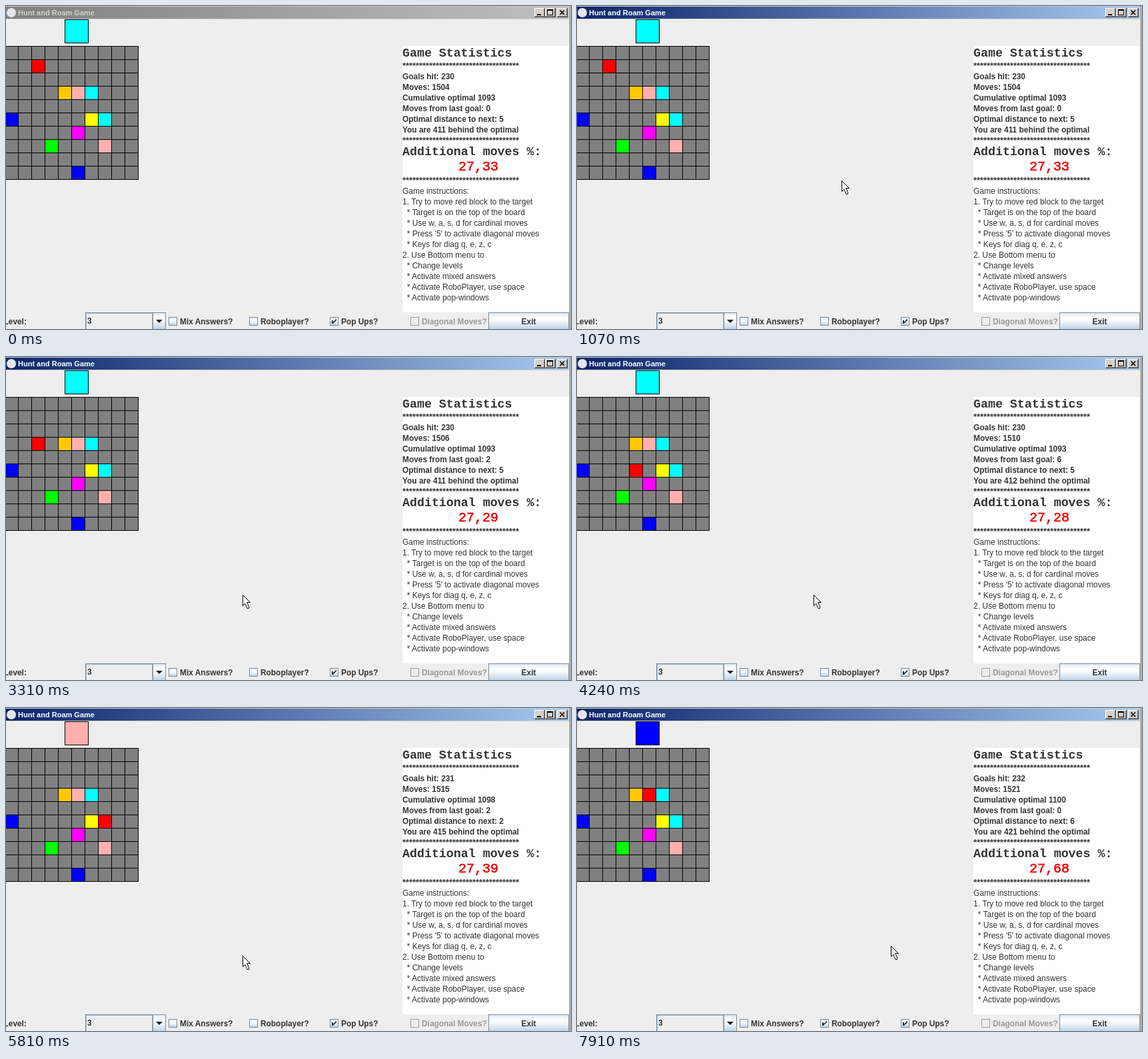
Recreate the animation shown at these times as an HTML page. Size 848 by 485 pixels, loop 7990 ms.

```html
<!DOCTYPE html>
<html lang="en">
<head>
<meta charset="utf-8">
<title>Hunt and Roam Game</title>
<style>
html, body { margin: 0; width: 100%; height: 100%; overflow: hidden; background: #eee; }
svg { display: block; }
text { font: 12px "Liberation Sans", Arial, sans-serif; fill: #333; white-space: pre; }
.bold { font-weight: bold; font-size: 11.9px; }
.stars { font-weight: bold; font-size: 12.85px; }
.head { font: bold 18.3px "Liberation Mono", monospace; }
.score { font: 20px "Liberation Mono", monospace; fill: #f00000; stroke: #f00000; stroke-width: .6px; }
.title { font-weight: bold; font-size: 11px; }
.off { font-weight: bold; font-size: 11.9px; fill: #999; }
</style>
</head>
<body>
<svg id="stage" width="848" height="485" viewBox="0 0 848 485"></svg>
<script>
const LOOP = 7990;
const CYAN = '#00ffff', PINK = '#ffafaf', BLUE = '#0000ff';
const BLOCKS = [
  [4, 3, '#ffc800'], [5, 3, PINK], [6, 3, CYAN], [0, 5, BLUE], [6, 5, '#ffff00'],
  [7, 5, CYAN], [5, 6, '#ff00ff'], [3, 7, '#00ff00'], [7, 7, PINK], [5, 9, BLUE]
];

// One key press per move, with the time it lands
const KEYS = 'ssssdddddwssswwqq';
const KEY_TIMES = [3080, 3310, 3470, 3630, 4010, 4240, 4400, 4560, 4710,
  5180, 5810, 5960, 6040, 6120, 7600, 7830, 7910];
const STEP = { w: [0, -1], s: [0, 1], d: [1, 0], q: [-1, -1] };
// Each goal: moves made when it appears, optimal distance, target colour
const GOALS = [[0, 5, CYAN], [9, 2, PINK], [17, 6, BLUE]];

// Pointer legs: first step, last step, number of steps, end x, end y
const LEGS = [
  [70, 680, 9, 417, 211], [990, 1690, 10, 317, 465], [1770, 1770, 1, 310, 485],
  [1840, 1840, 1, 303, 475], [2080, 2080, 1, 310, 479], [2150, 2150, 1, 310, 485],
  [2700, 2700, 1, 383, 475], [2780, 2780, 1, 383, 485], [3080, 3080, 1, 372, 464],
  [3160, 3160, 1, 355, 357], [4560, 4560, 1, 355, 358], [5260, 5420, 3, 355, 372],
  [5960, 6120, 3, 405, 453], [6350, 6500, 3, 409, 460], [6660, 6660, 1, 400, 466],
  [6810, 6970, 3, 402, 435], [7130, 7370, 4, 471, 357]
];

const rect = (x, y, w, h, fill, extra = '') =>
  `<rect x="${x}" y="${y}" width="${w}" height="${h}" fill="${fill}" ${extra}/>`;
const frame = (x, y, w, h, fill, stroke) =>
  rect(x + .5, y + .5, w - 1, h - 1, fill, `stroke="${stroke}"`);
const text = (x, y, cls, str, extra = '') =>
  `<text x="${x}" y="${y}" class="${cls}" ${extra}>${str}</text>`;
const line = (d, stroke, width = 1) =>
  `<path d="${d}" fill="none" stroke="${stroke}" stroke-width="${width}"/>`;
const cell = (c, r, fill, extra) => rect(20 * c - 1, 61 + 20 * r, 19, 19, fill, extra);
const gradient = (id, dir, ...stops) => `<linearGradient id="${id}" x2="${dir}" y2="${1 - dir}">` +
  stops.map(([at, color]) => `<stop offset="${at}" stop-color="${color}"/>`).join('') + '</linearGradient>';

function windowButton(x, icon) {
  return rect(x, 3, 16, 14, '#404040') + rect(x, 3, 15, 13, '#fff') +
    rect(x + 1, 4, 14, 12, '#808080') + rect(x + 1, 4, 13, 11, '#d4d0c8') +
    `<g transform="translate(${x} 3)">${icon}</g>`;
}

function checkBox(x, label, id, enabled = true) {
  return frame(x, 467, 13, 13, enabled ? 'url(#ocean)' : '#eee', enabled ? '#7a8a99' : '#999') +
    rect(x + 2, 469, 9, 9, 'none', `id="${id}Hover" stroke="#b8cfe5" stroke-width="2"`) +
    `<path id="${id}Tick" d="M${x + 3} 472h2v2.5l4.5 -4.5h.5v2l-5 4.5v.5h-2z" fill="#222"/>` +
    text(x + 17, 478, enabled ? 'bold' : 'off', label);
}

function grid() {
  let d = '';
  for (let i = 0; i <= 10; i++) d += `M0 ${60.5 + 20 * i}H199`;
  for (let i = 0; i < 10; i++) d += `M${18.5 + 20 * i} 60V261`;
  return rect(0, 60, 199, 201, '#808080') + line(d, '#000');
}

const stars = y => text(595, y, 'stars', '*'.repeat(35));
const instructions = ['Game instructions:', '1. Try to move red block to the target',
  '  * Target is on the top of the board', '  * Use w, a, s, d for cardinal moves',
  "  * Press '5' to activate diagonal moves", '  * Keys for diag q, e, z, c',
  '2. Use Bottom menu to', '  * Change levels', '  * Activate mixed answers',
  '  * Activate RoboPlayer, use space', '  * Activate pop-windows'];

document.getElementById('stage').innerHTML =
  '<defs>' +
  gradient('idle', 1, [0, '#808080'], [1, '#c0c0c0']) +
  gradient('active', 1, [0, '#0a246a'], [1, '#a6caf0']) +
  gradient('ocean', 0, [0, '#dde8f3'], [.3, '#fff'], [.5, '#f4f8fb'], [1, '#b8cfe5']) +
  '</defs>' +
  rect(0, 0, 848, 485, '#eee') + rect(0, 0, 848, 20, '#d4d0c8') +
  rect(845, 0, 3, 485, '#d4d0c8') + rect(846, 0, 1, 485, '#808080') +
  rect(0, 1, 845, 18, 'url(#idle)', 'id="bar"') +
  '<circle cx="8" cy="10" r="7" fill="#e6e6ea"/>' +
  text(18, 14, 'title', 'Hunt and Roam Game', 'id="caption"') +
  windowButton(793, rect(4, 9, 6, 2, '#000')) +
  windowButton(809, frame(3, 2, 9, 9, 'none', '#000') + rect(3, 2, 9, 2, '#000')) +
  windowButton(827, line('M4.5 3.5l6.5 6.5M11 3.5l-6.5 6.5', '#000', 1.7)) +
  rect(88.5, 20.5, 35, 35, CYAN, 'id="target" stroke="#000"') +
  grid() + BLOCKS.map(b => cell(...b)).join('') + cell(0, 0, '#ff0000', 'id="player"') +
  rect(595, 60, 250, 400, '#fff') +
  text(595, 75.5, 'head', 'Game Statistics') + stars(94) +
  [0, 1, 2, 3, 4, 5].map(i => text(595, 110 + 16 * i, 'bold', '', `id="stat${i}"`)).join('') +
  stars(206) + text(595, 224, 'head', 'Additional moves %:') +
  text(679, 247, 'score', '', 'id="score"') + stars(266) +
  instructions.map((s, i) => text(595, 282 + 16 * i, '', s)).join('') +
  text(-3.5, 478, 'bold', 'Level:') +
  frame(119, 460, 121, 27, '#eee', '#7a8a99') + frame(120, 461, 100, 25, '#eee', '#a3b8cc') +
  frame(220, 460, 20, 27, 'url(#ocean)', '#7a8a99') +
  '<path d="M225 471h10l-5 5z" fill="#222"/>' + text(122, 477, 'bold', '3') +
  checkBox(244, 'Mix Answers?', 'mix') + checkBox(365, 'Roboplayer?', 'robo') +
  checkBox(486, 'Pop Ups?', 'pop') + checkBox(607, 'Diagonal Moves?', 'diag', false) +
  frame(724, 460, 121, 27, 'url(#ocean)', '#7a8a99') +
  text(784.5, 478, 'bold', 'Exit', 'text-anchor="middle"') +
  '<path id="pointer" d="M.5 .5V16.5L3.8 13.2L7 20.5H9.3L9.8 19L6.8 11.5H11.5Z" fill="#fff" stroke="#000"/>';

const $ = id => document.getElementById(id);
const show = (id, on) => $(id).setAttribute('visibility', on ? 'visible' : 'hidden');

function pointerAt(t) {
  let x = 445, y = 485;
  for (const [from, to, steps, endX, endY] of LEGS) {
    if (t < from) break;
    const gap = (to - from) / (steps - 1 || 1) || 1;
    const done = Math.min(1, (Math.floor((t - from) / gap + 1e-6) + 1) / steps);
    x += (endX - x) * done;
    y += (endY - y) * done;
  }
  return [Math.round(x), Math.round(y)];
}

function draw(t) {
  const made = KEY_TIMES.filter(k => t >= k).length;
  let col = 2, row = 1;
  for (const key of KEYS.slice(0, made)) {
    col += STEP[key][0];
    row += STEP[key][1];
  }
  const hit = GOALS.filter(g => made >= g[0]).length - 1;
  const [since, distance, color] = GOALS[hit];
  const moves = 1504 + made, recent = made - since;
  const optimal = GOALS.slice(0, hit).reduce((sum, g) => sum + g[1], 1093);
  const behind = moves - optimal - Math.min(recent, distance);

  [`Goals hit: ${230 + hit}`, `Moves: ${moves}`, `Cumulative optimal ${optimal}`,
    `Moves from last goal: ${recent}`, `Optimal distance to next: ${distance}`,
    `You are ${behind} behind the optimal`].forEach((s, i) => $('stat' + i).textContent = s);
  $('score').textContent = (100 * behind / moves).toFixed(2).replace('.', ',');
  $('target').setAttribute('fill', color);
  $('player').setAttribute('x', 20 * col - 1);
  $('player').setAttribute('y', 61 + 20 * row);

  const active = t >= 760;
  $('bar').setAttribute('fill', active ? 'url(#active)' : 'url(#idle)');
  $('caption').style.fill = active ? '#fff' : '#d4d0c8';
  show('mixHover', t >= 1690 && t < 2310);
  show('roboHover', t >= 2700 && t < 2780 || t >= 6350 && t < 6890);
  show('roboTick', t >= 6810);
  $('pointer').setAttribute('transform', `translate(${pointerAt(t)})`);
}

['mixTick', 'diagTick', 'popHover', 'diagHover'].forEach(id => show(id, false));
const start = performance.now();
function tick() {
  draw((performance.now() - start) % LOOP);
  requestAnimationFrame(tick);
}
tick();
</script>
</body>
</html>
```
